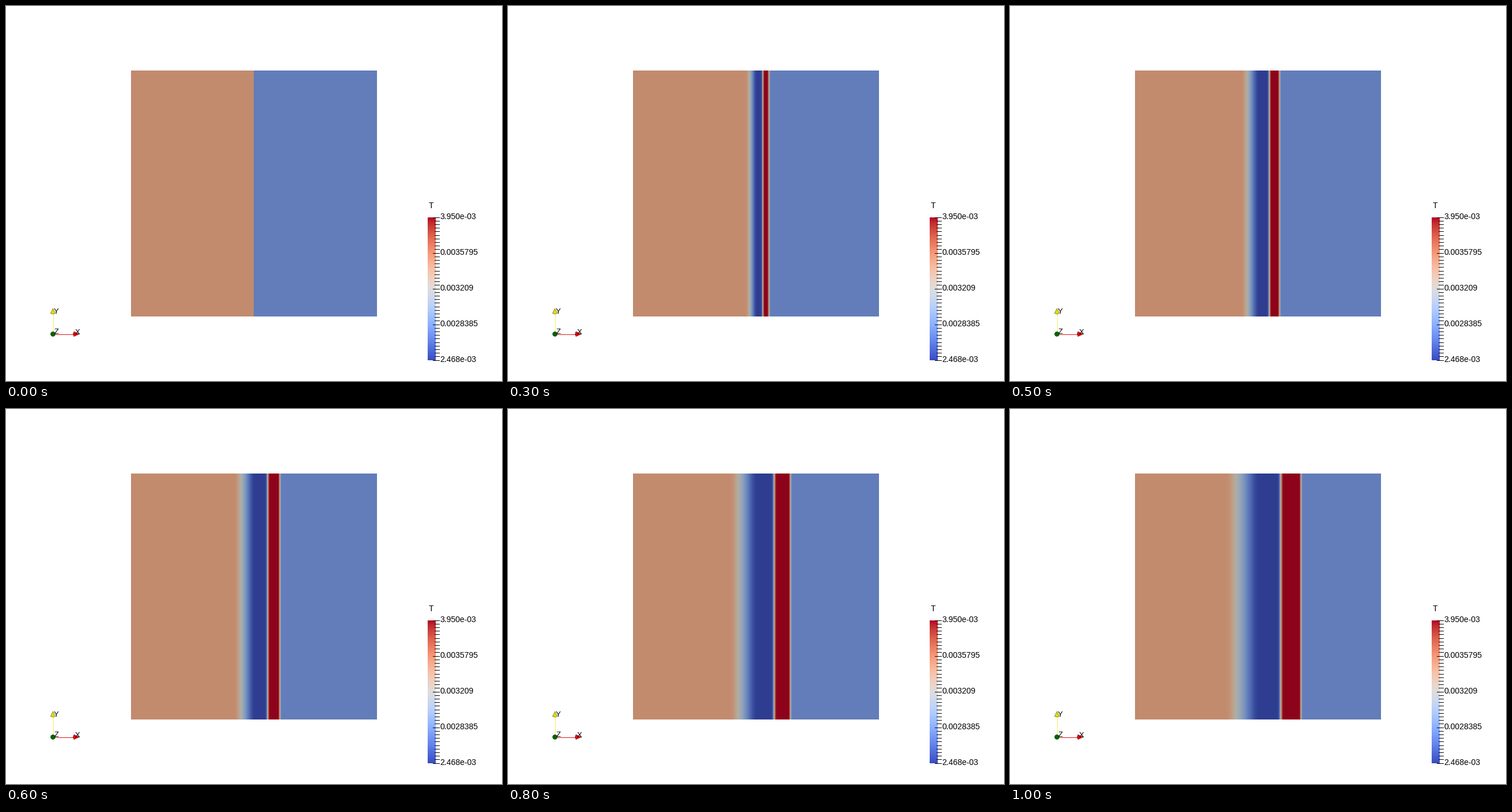
Recreate the animation shown at these times as a matplotlib script. Size 861 by 651 pixels, loop 1.1 s.

```python
import math

import matplotlib.pyplot as plt
import numpy as np
from matplotlib.animation import FuncAnimation
from matplotlib.patches import Circle, Polygon

W, H, DPI = 861, 651, 100
FRAMES, STEP_MS = 11, 100
PX = 72 / DPI  # one pixel in points
X0, X1, Y0, Y1 = 217, 644, 112, 539
MID = (X0 + X1) / 2

# Shock tube: temperatures relative to the left state, wave speeds, scale
T_LEFT, T_MIN, T_MAX = 3.484, 2.468, 3.950
COLD, HOT, RIGHT = 0.711, 1.141, 0.795
SOUND = math.sqrt(1.4)
TAIL, CONTACT, SHOCK = -0.070, 0.927, 1.752
SPEED = 4.25  # pixels per frame for unit speed
SHADE = np.array([0.787, 0.785, 0.745])

NODES = np.linspace(-2.5, 2.5, 21)
WEIGHTS = np.exp(-NODES ** 2 / 2)
WEIGHTS /= WEIGHTS.sum()
erf = np.vectorize(math.erf)


def fan(x, t):
    """Temperature through the rarefaction wave."""
    xi = np.clip(x / (SPEED * t), -SOUND, TAIL)
    return ((5 - xi / SOUND) / 6) ** 2


def step(x, sigma):
    return (1 + erf(x / (sigma * math.sqrt(2)))) / 2


def temperature(t):
    x = np.arange(X0, X1) + 0.5 - MID
    if t == 0:
        return np.where(x < 0, 1.0, RIGHT)
    blur = 1.5 + 0.2 * t
    temp = sum(w * fan(x + blur * z, t) for w, z in zip(WEIGHTS, NODES))
    temp += (HOT - COLD) * step(x - CONTACT * SPEED * t, 1.0 + 0.12 * t)
    temp += (RIGHT - HOT) * step(x - SHOCK * SPEED * t, 1.4)
    return temp


def field(t):
    level = (temperature(t) * T_LEFT - T_MIN) / (T_MAX - T_MIN)
    return (plt.cm.coolwarm(np.clip(level, 0, 1))[:, :3] * SHADE)[None]


fig = plt.figure(figsize=(W / DPI, H / DPI), dpi=DPI, facecolor="white")
ax = fig.add_axes([0, 0, 1, 1])


def line(x, y, color="black"):
    ax.plot(x, y, color=color, lw=PX, solid_capstyle="butt", antialiased=False)


def label(x, y, text, size=14, **kw):
    ax.text(x, y, text, family="Liberation Sans", fontsize=size * PX,
            color="black", va="baseline", zorder=5, **kw)


square = ax.imshow(field(0), extent=(X0, X1, Y1, Y0), interpolation="nearest")

# Colour legend
ramp = plt.cm.coolwarm(np.linspace(1, 0, 248))[:, None, :3]
ax.imshow(ramp, extent=(732, 746, 615, 367), interpolation="nearest")
for i in range(41):
    y = 366.5 + 6.2 * i
    line([741 if i % 10 == 0 else 744, 752], [y, y])
names = ["3.950e-03", "0.0035795", "0.003209", "0.0028385", "2.468e-03"]
for i, name in enumerate(names):
    label(753, 370 + 62 * i, name)
label(737.7, 351, "T", ha="center")

# Orientation axes
line([81.5, 81.5], [534, 567], "#f0f05a")
line([84, 118], [569.5, 569.5], "#e0141e")
ax.add_patch(Polygon([(81.5, 525), (77.3, 533.5), (81.5, 535), (85.7, 533.5)],
                     fc="#e1dc0a", ec="#55550a", lw=0.4, zorder=3))
ax.add_patch(Polygon([(127, 569.5), (118, 565.3), (116.5, 569.5), (118, 573.7)],
                     fc="#e60000", ec="#5a0000", lw=0.4, zorder=3))
ax.add_patch(Circle((81.5, 569.5), 4, fc="#006400", ec="#003c00", lw=0.4, zorder=3))
label(83, 534, "Y", 13)
label(119.3, 570, "X", 13)
label(83.7, 569, "Z", 13)

ax.set(xlim=(0, W), ylim=(H, 0), aspect="auto")
ax.axis("off")


def update(i):
    square.set_data(field(i))
    return (square,)


anim = FuncAnimation(fig, update, frames=FRAMES, interval=STEP_MS, repeat=True)
plt.show()
```
